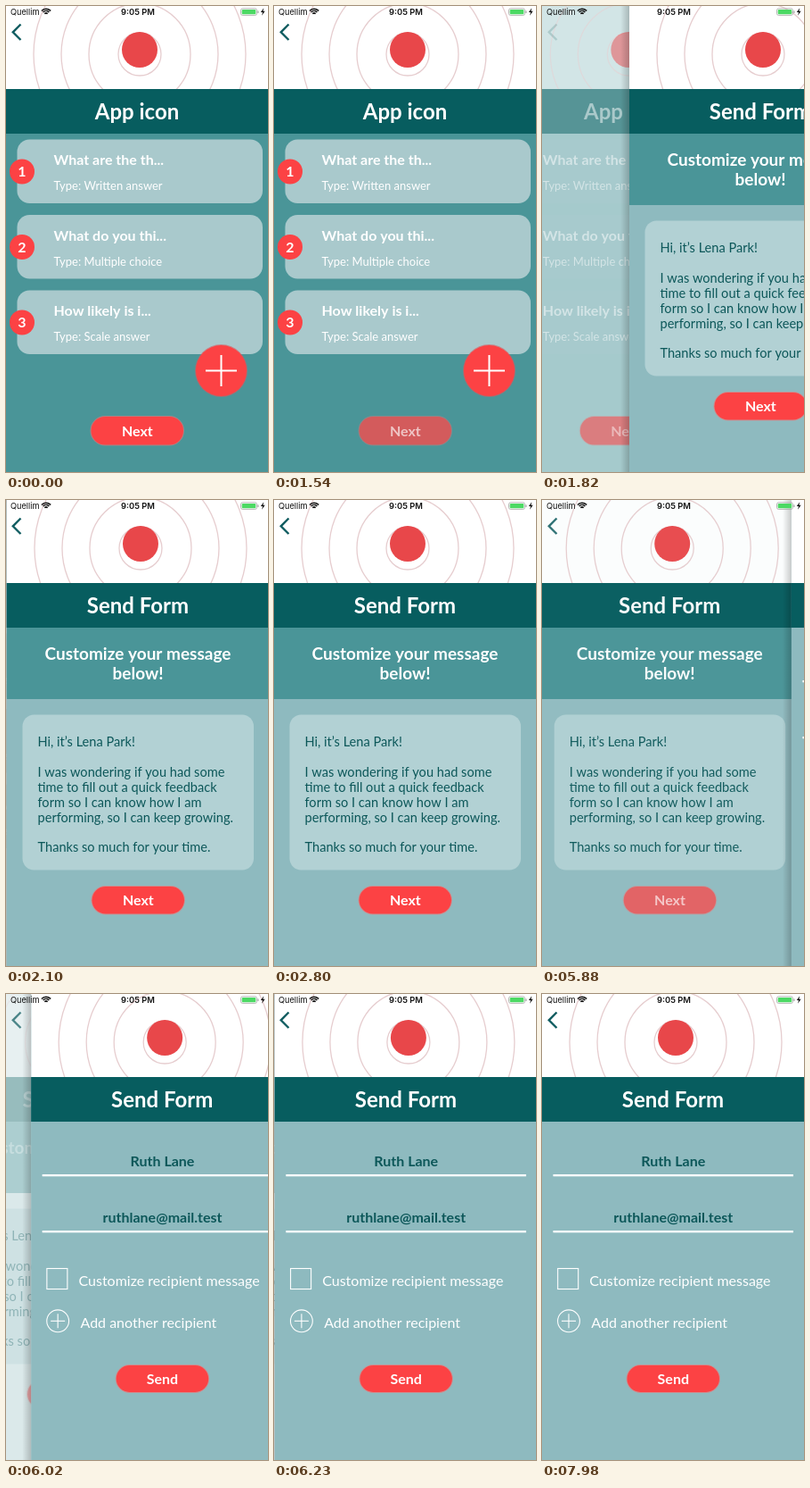
Recreate the animation shown at these times as an HTML page with a canvas. Size 294 by 522 pixels, loop 8 s.

```html
<!DOCTYPE html>
<html lang="en">
<head>
<meta charset="utf-8">
<title>Feedback form flow</title>
<style>
  html, body { margin: 0; width: 100%; height: 100%; overflow: hidden; background: #fff; }
  canvas { display: block; width: 294px; height: 522px; }
</style>
</head>
<body>
<canvas id="stage"></canvas>
<script>
const W = 294, H = 522, LOOP = 8000;
const RED = '#fc4244', DARK = '#075d5f', TEAL = '#4a9598', PALE = '#8ebabf', INK = '#0c5759';
const NETWORK = 'Quellim', SENDER = 'Lena Park', GUEST = 'Ruth Lane', MAIL = 'ruthlane@mail.test';

const canvas = document.getElementById('stage');
const ctx = canvas.getContext('2d');
const scale = Math.max(1, window.devicePixelRatio || 1);
canvas.width = W * scale;
canvas.height = H * scale;

const clamp = v => Math.min(1, Math.max(0, v));
const easeInOut = v => v < 0.5 ? 2 * v * v : 1 - 2 * (1 - v) * (1 - v);

function box(x, y, w, h, color) {
  ctx.fillStyle = color;
  ctx.fillRect(x, y, w, h);
}

function round(x, y, w, h, r, color) {
  ctx.beginPath();
  ctx.roundRect(x, y, w, h, r);
  ctx.fillStyle = color;
  ctx.fill();
}

function disc(x, y, r, color) {
  ctx.beginPath();
  ctx.arc(x, y, r, 0, Math.PI * 2);
  ctx.fillStyle = color;
  ctx.fill();
}

function ring(x, y, r, color, width) {
  ctx.beginPath();
  ctx.arc(x, y, r, 0, Math.PI * 2);
  ctx.strokeStyle = color;
  ctx.lineWidth = width;
  ctx.stroke();
}

function path(points, color, width) {
  ctx.beginPath();
  points.forEach(([x, y]) => ctx.lineTo(x, y));
  ctx.strokeStyle = color;
  ctx.lineWidth = width;
  ctx.stroke();
}

function plus(x, y, arm, width) {
  path([[x - arm, y], [x + arm, y]], '#fff', width);
  path([[x, y - arm], [x, y + arm]], '#fff', width);
}

function text(str, x, y, size, { color = '#fff', weight = 400, align = 'left', family = 'Lato' } = {}) {
  ctx.font = `${weight} ${size}px ${family}, sans-serif`;
  ctx.textAlign = align;
  ctx.fillStyle = color;
  ctx.fillText(str, x, y);
}

const bold = (str, x, y, size, color) =>
  text(str, x, y, size, { color, weight: 700, align: 'center' });

// Runs draw() with its own opacity, multiplied into the current one.
function faded(alpha, draw) {
  ctx.save();
  ctx.globalAlpha *= alpha;
  draw();
  ctx.restore();
}

function pill(label, y, h, alpha = 1) {
  faded(alpha, () => {
    round(94.5, y - 0.5, 105.5, h + 1, (h + 1) / 2, 'rgba(236,120,120,0.6)');
    round(95.5, y + 0.5, 103.5, h - 1, (h - 1) / 2, RED);
    bold(label, 147.3, y + h / 2 + 6, 16);
  });
}

function header(title, body) {
  box(0, 0, W, H, body);
  ctx.save();
  ctx.beginPath();
  ctx.rect(0, 0, W, 93);
  ctx.clip();
  box(0, 0, W, 93, '#fff');
  for (const r of [24, 57, 88, 119]) ring(150, 54, r, '#e6cdcf', 1.3);
  disc(150, 49, 20, '#e8474a');
  ctx.restore();
  box(0, 93, W, 50, DARK);
  bold(title, 147, 127, 24);
}

function questions(press) {
  header('App icon', TEAL);
  const cards = [
    ['What are the th...', 'Written answer'],
    ['What do you thi...', 'Multiple choice'],
    ['How likely is i...', 'Scale answer']
  ];
  cards.forEach(([title, type], i) => {
    const y = 149.5 + i * 84.5;
    round(12.5, y, 275.5, 71.5, 14, '#a9c9cc');
    text(title, 53.5, y + 28.5, 16, { weight: 700 });
    text('Type: ' + type, 53.5, y + 56.5, 13);
    disc(18, y + 36, 14, RED);
    bold(i + 1, 18, y + 41.7, 16);
  });
  disc(241.5, 408.5, 29.5, 'rgba(215,90,95,0.6)');
  disc(241.5, 408.5, 28.5, RED);
  plus(241.5, 408.5, 17.5, 2);
  pill('Next', 459.5, 32.5, press);
}

function message(press) {
  header('Send Form', PALE);
  box(0, 143, W, 80, TEAL);
  bold('Customize your message', 147, 179, 19);
  bold('below!', 147, 201, 19);
  round(17.5, 240.5, 259.5, 174, 13, '#b2d1d4');
  const lines = [
    `Hi, it’s ${SENDER}!`, '',
    'I was wondering if you had some',
    'time to fill out a quick feedback',
    'form so I can know how I am',
    'performing, so I can keep growing.', '',
    'Thanks so much for your time.'
  ];
  lines.forEach((line, i) => text(line, 34.5, 276 + i * 16.9, 14.6, { color: INK }));
  pill('Next', 432.5, 31.5, press);
}

function recipients() {
  header('Send Form', PALE);
  bold(GUEST, 147.3, 193, 16, INK);
  bold(MAIL, 147.3, 256, 16, INK);
  for (const y of [202, 265]) box(12.5, y, 269.5, 2.3, '#fff');
  ctx.strokeStyle = '#fff';
  ctx.lineWidth = 1.1;
  ctx.strokeRect(17.7, 307.5, 23, 23);
  text('Customize recipient message', 53.3, 327, 16);
  ring(30, 366.3, 12.4, '#fff', 1.1);
  plus(30, 366.3, 8, 1.1);
  text('Add another recipient', 55.3, 374, 16);
  pill('Send', 415.5, 31);
}

function statusBar() {
  text(NETWORK, 5, 10, 9.2, { color: '#111', family: 'Inter' });
  text('9:05 PM', 148, 10, 9.4, { color: '#111', weight: 600, align: 'center', family: 'Inter' });
  for (const r of [2.2, 4.6, 7]) {
    ctx.beginPath();
    ctx.arc(45, 10.2, r, -Math.PI * 0.76, -Math.PI * 0.24);
    ctx.strokeStyle = '#111';
    ctx.lineWidth = 1.5;
    ctx.stroke();
  }
  ctx.beginPath();
  ctx.roundRect(263.5, 2.8, 18, 7.6, 2);
  ctx.strokeStyle = '#a5a5a5';
  ctx.lineWidth = 0.8;
  ctx.stroke();
  round(264.7, 4, 15.6, 5.2, 1, '#4cd964');
  round(282.4, 5.2, 1.2, 2.8, 0.6, '#a5a5a5');
  ctx.beginPath();
  [[289.2, 2.2], [285.8, 7], [288, 7], [287, 10.8], [290.6, 5.8], [288.4, 5.8]]
    .forEach(([x, y]) => ctx.lineTo(x, y));
  ctx.fillStyle = '#111';
  ctx.fill();
}

function chevron(alpha) {
  faded(alpha, () => path([[16.5, 20.5], [7.8, 29.3], [16.5, 38]], '#0f5c60', 2.4));
}

const flow = [
  { page: questions, tap: 1475, push: 1754 },
  { page: message, tap: 5605, push: 5878 },
  { page: recipients, tap: Infinity, push: Infinity }
];

// Button opacity: dims on touch, recovers on release.
function touch(t, tap) {
  const dt = t - tap;
  if (dt < 0) return 1;
  if (dt < 140) return 1 - 0.8 * easeInOut(dt / 140);
  return 0.2 + 0.8 * easeInOut(clamp((dt - 140) / 250));
}

function shadow(x) {
  const g = ctx.createLinearGradient(x - 10, 0, x, 0);
  g.addColorStop(0, 'rgba(0,0,0,0)');
  g.addColorStop(1, 'rgba(0,0,0,0.2)');
  box(x - 10, 0, 10, H, g);
}

function shifted(x, draw) {
  ctx.save();
  ctx.translate(x, 0);
  draw();
  ctx.restore();
}

function render(t) {
  ctx.setTransform(scale, 0, 0, scale, 0, 0);
  box(0, 0, W, H, '#fff');
  let i = 0;
  while (t >= flow[i].push + 600) i++;
  const { page, tap, push } = flow[i];
  const press = touch(t, tap);
  let arrow = 1;
  if (t < push) {
    page(press);
  } else {
    const rest = Math.exp(-0.0164 * (t - push));
    const p = 1 - rest;
    const x = W * rest;
    shifted(-79 * p, () => faded(1 - 0.75 * p, () => page(press)));
    shadow(x);
    shifted(x, () => flow[i + 1].page(1));
    arrow = Math.abs(1 - 2 * p) ** 1.5;
  }
  chevron(arrow);
  statusBar();
}

const start = performance.now();
function tick() {
  render((performance.now() - start) % LOOP);
  requestAnimationFrame(tick);
}
tick();
</script>
</body>
</html>
```
